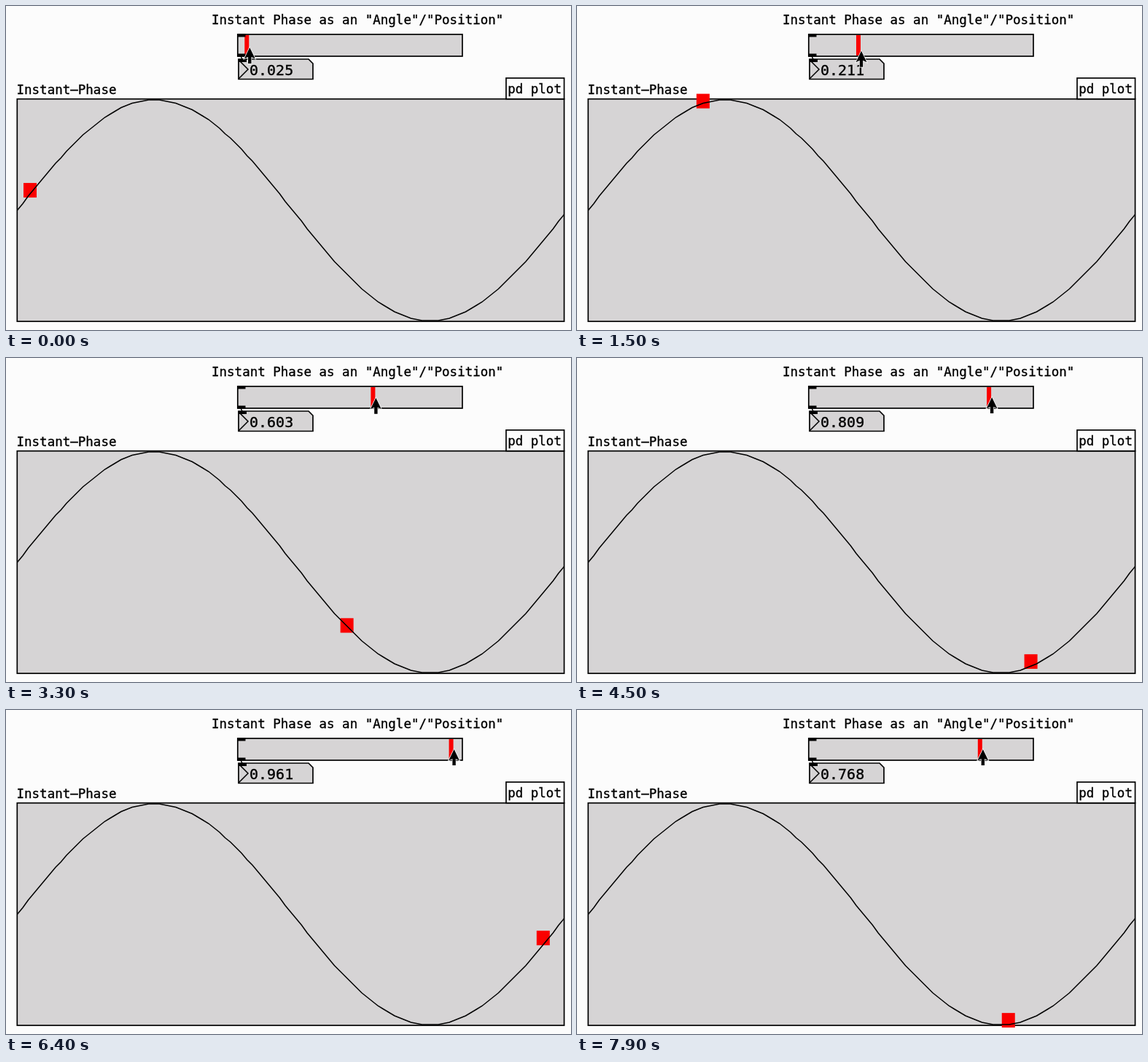
An HTML page that plays this animation: 775x445 px, repeating every 8000 ms.

```html
<!DOCTYPE html>
<html lang="en">
<head>
<meta charset="utf-8">
<title>Instant phase</title>
<style>
  html, body { margin: 0; width: 100%; height: 100%; overflow: hidden; background: #fcfcfc; }
  svg { display: block; }
  text { font: 17.5px "DejaVu Sans Mono", monospace; white-space: pre; stroke: #000; stroke-width: .35; }
  .box { fill: #d6d4d5; stroke: #000; stroke-width: 1.7; }
  .line { fill: none; stroke: #000; stroke-width: 1.5; }
  .red { fill: #fa0000; }
</style>
</head>
<body>
<svg width="775" height="445" viewBox="0 0 775 445">
  <text x="282" y="24.5">Instant Phase as an "Angle"/"Position"</text>
  <text x="14.5" y="121">Instant–Phase</text>

  <rect class="box" x="15.3" y="127.7" width="750.3" height="305.5"/>
  <rect class="box" x="686" y="99" width="79.6" height="28.7" style="fill:#fcfcfc"/>
  <text x="688.2" y="119.500">pd plot</text>

  <rect id="marker" class="red" x="-9" y="-10" width="18" height="20"/>
  <path id="curve" class="line"/>

  <rect class="box" x="317.800" y="39" width="308.200" height="30"/>
  <rect id="knob" class="red" x="-3" y="40" width="6" height="28"/>
  <path class="box" d="M319 73H415L421 79V100.500H319Z"/>
  <path class="line" d="M319 74L332 87L319 100M322 69L325 75"/>
  <path d="M317.500 38.500h11v4h-11zM317.500 65.500h11v4h-11zM319 73h11v4h-11z"/>
  <text id="value" x="334" y="94.800" style="font-size:20px"></text>

  <path id="cursor" d="M0 0L7.500 15.500L2.200 13V22H-2.200V13L-7.500 15.500Z"
        stroke="#fcfcfc" stroke-width="1.500" paint-order="stroke"/>
</svg>
<script>
const $ = id => document.getElementById(id);
const LOOP = 8000, STEP = 100, TAU = 2 * Math.PI;

// Drag of the slider: [time, phase]
const keys = [
  [0, .025], [1500, .211], [3300, .603], [4500, .809], [5500, .959],
  [5900, 1], [6000, 1], [7200, .874], [7900, .768]
];

const slope = k => {
  const a = keys[Math.max(k - 1, 0)], b = keys[Math.min(k + 1, keys.length - 1)];
  return (b[1] - a[1]) / (b[0] - a[0]);
};

// Smooth curve through the keys (cubic Hermite)
function phaseAt(t) {
  const i = Math.max(0, keys.findIndex(k => t <= k[0]) - 1);
  const [t0, v0] = keys[i], [t1, v1] = keys[i + 1];
  const d = t1 - t0, u = (t - t0) / d, w = 1 - u;
  const v = v0 * w * w * (1 + 2 * u) + v1 * u * u * (3 - 2 * u)
          + d * u * w * (w * slope(i) - u * slope(i + 1));
  return Math.min(1, v);
}

const move = (id, x, y = 0) => $(id).setAttribute("transform", `translate(${x} ${y})`);

// One sine period, snapped to a coarse vertical grid
const points = Array.from({ length: 101 }, (_, i) => {
  const y = 280.5 - 151.5 * Math.sin(TAU * 7.5 * i / 755);
  return [15.5 + 7.5 * i, Math.round(y / 1.5) * 1.5];
});
$("curve").setAttribute("d", "M" + points.join("L"));

function draw(now) {
  const t = Math.floor(now % LOOP / STEP) * STEP;
  const phase = phaseAt(t);
  const knobX = 322.8 + 299.5 * phase;
  const dip = 8 * Math.exp(-(((t - 1300) / 1300) ** 2));
  move("marker", 14.2 + 752 * phase, 276.6 - 150.5 * Math.sin(TAU * phase));
  move("knob", knobX);
  move("cursor", knobX + 4, 54 + dip);
  $("value").textContent = phase > .9995 ? "1" : phase.toFixed(3);
}

const start = performance.now();
function tick() {
  draw(performance.now() - start);
  requestAnimationFrame(tick);
}
tick();
</script>
</body>
</html>
```
